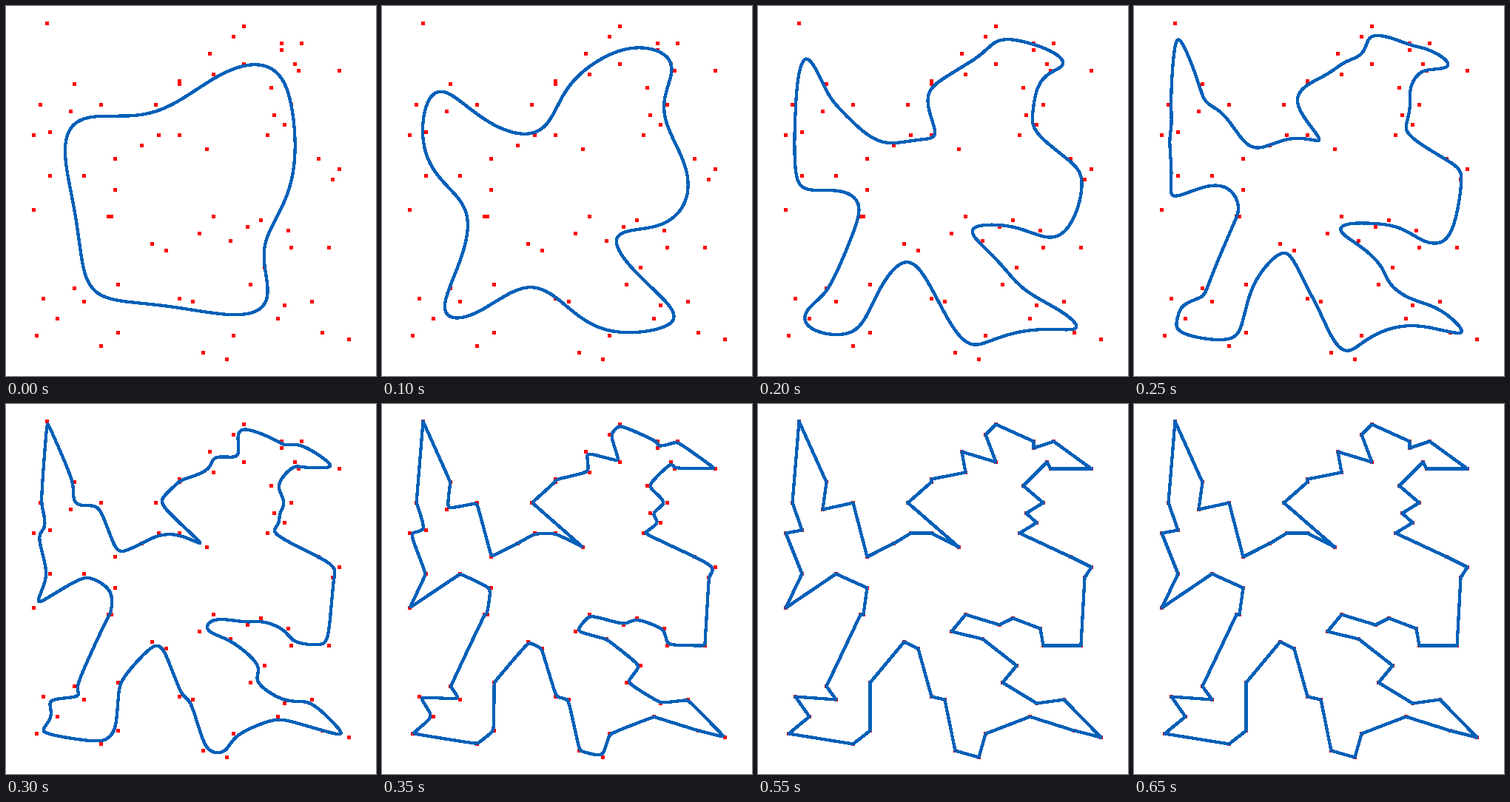
A matplotlib script that plays this animation: 500 px wide and 500 px high, repeating every 1650 ms.

```python
import numpy as np
import matplotlib.pyplot as plt
from matplotlib.animation import FuncAnimation
from matplotlib.collections import PatchCollection
from matplotlib.patches import Circle

SIZE, DPI = 500, 100
FRAMES, INTERVAL = 33, 50
SETTLED = 13                # step at which the loop comes to rest
WIDTH, DECAY = 4.2, 0.72    # neighbourhood at the start, shrink per step
SAMPLES = 6000
BLUE, RED = "#0060b8", "#ff0000"

# Cities in the order of the finished tour
TOUR = np.array([
    (55, 23), (92, 105), (87, 142), (128, 133), (147, 206), (183, 188), (206, 174),
    (234, 174), (271, 193), (202, 133), (234, 105), (234, 101), (280, 92), (275, 64),
    (321, 78), (307, 41), (321, 27), (372, 50), (372, 59), (399, 50), (450, 87),
    (395, 87), (390, 78), (358, 110), (385, 133), (362, 147), (376, 160), (353, 174),
    (422, 206), (450, 220), (441, 234), (436, 326), (385, 326), (381, 303), (344, 289),
    (326, 298), (280, 284), (261, 307), (303, 317), (349, 353), (330, 376), (376, 404),
    (413, 399), (463, 450), (427, 441), (367, 422), (307, 445), (298, 477), (266, 468),
    (252, 399), (234, 395), (216, 330), (197, 321), (151, 376), (151, 441), (128, 459),
    (41, 445), (69, 422), (50, 395), (105, 399), (92, 381), (138, 284), (142, 284),
    (147, 248), (105, 229), (37, 275), (59, 229), (37, 174), (59, 170), (46, 133),
], float)


def ring_positions(pts):
    """Place of each city on the ring: half by count, half by distance."""
    edges = np.hypot(*(np.roll(pts, -1, axis=0) - pts).T)
    gaps = 0.5 + 0.5 * edges / edges.mean()
    return np.cumsum(gaps) - gaps


# Distance along the ring from every sample to every city
count = len(TOUR)
ring = np.linspace(0, count, SAMPLES)
offset = (ring[:, None] - ring_positions(TOUR) + count / 2) % count - count / 2


def loop_at(step):
    """Each point of the ring is the Gaussian mean of the cities near it."""
    sigma = WIDTH * DECAY ** min(step, SETTLED)
    pull = np.exp(-0.5 * (offset / sigma) ** 2)
    return pull @ TOUR / pull.sum(axis=1, keepdims=True)


fig = plt.figure(figsize=(SIZE / DPI, SIZE / DPI), dpi=DPI, facecolor="white")
ax = fig.add_axes([0, 0, 1, 1])
ax.set_xlim(-0.5, SIZE - 0.5)
ax.set_ylim(SIZE - 0.5, -0.5)
ax.axis("off")

dots = [Circle(city, 2.5) for city in TOUR]
ax.add_collection(PatchCollection(dots, facecolor=RED, linewidth=0,
                                  antialiased=False, zorder=1))
line, = ax.plot([], [], color=BLUE, lw=3.2 * 72 / DPI, solid_joinstyle="round",
                antialiased=False, zorder=2)


def draw(step):
    line.set_data(*loop_at(step).T)
    return line,


anim = FuncAnimation(fig, draw, frames=FRAMES, interval=INTERVAL,
                     repeat=True, repeat_delay=0)
plt.show()
```
